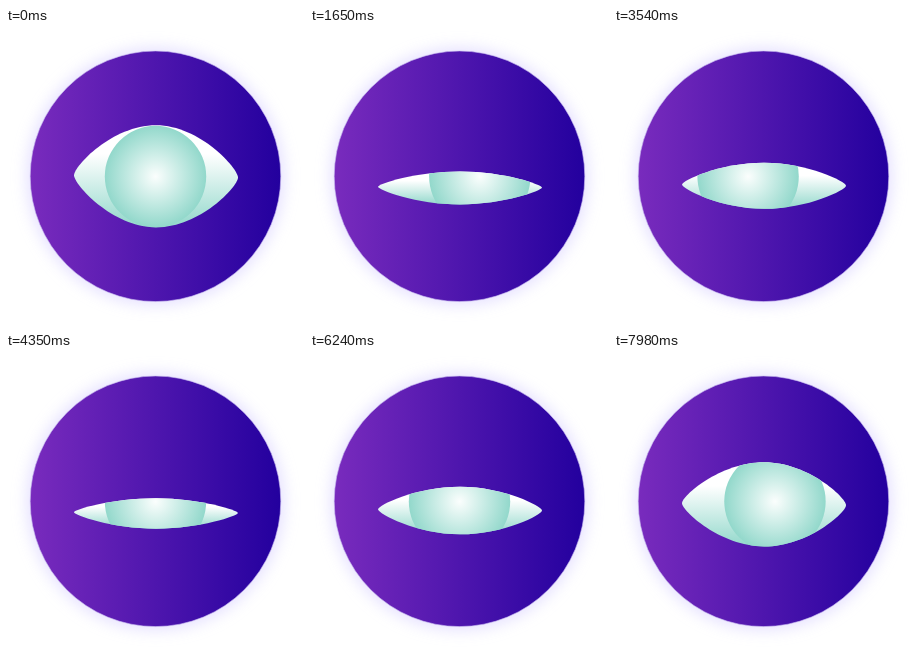
Animation of 298 by 297 pixels, one loop 8 s. Source, as an HTML page:

```html
<!DOCTYPE html>
<html lang="en">
<head>
<meta charset="utf-8">
<title>Blinking eye</title>
<style>
  html, body { margin: 0; width: 100%; height: 100%; overflow: hidden; background: #fff; }
  svg { display: block; width: 100%; height: 100%; }
</style>
</head>
<body>
<svg viewBox="0 0 298 297">
  <defs>
    <linearGradient id="disc">
      <stop offset="0" stop-color="#792bbd"/>
      <stop offset="1" stop-color="#23009e"/>
    </linearGradient>
    <linearGradient id="white" x2="0" y2="1">
      <stop offset=".28" stop-color="#fff"/>
      <stop offset="1" stop-color="#92d8cb"/>
    </linearGradient>
    <radialGradient id="mint">
      <stop offset="0" stop-color="#fbfefd"/>
      <stop offset="1" stop-color="#92d8cb"/>
    </radialGradient>
    <filter id="blur" x="-20%" y="-20%" width="140%" height="140%">
      <feGaussianBlur stdDeviation="8"/>
    </filter>
    <clipPath id="lids"><path id="opening"/></clipPath>
  </defs>
  <circle cx="149.5" cy="148.5" r="128" fill="#dcd6ff" opacity=".8" filter="url(#blur)"/>
  <circle cx="149.5" cy="148.3" r="125.3" fill="url(#disc)" stroke="#c9bdf0" stroke-width=".6"/>
  <path id="eye" fill="url(#white)"/>
  <g clip-path="url(#lids)">
    <circle id="iris" cy="148.5" r="50.7" fill="url(#mint)"/>
  </g>
</svg>
<script>
const LOOP = 8000;
const $ = id => document.getElementById(id);
const eye = $('eye'), opening = $('opening'), iris = $('iris');

// [time, value] keys, linear in between
const blink = [[0, 1], [1274, .1], [2770, 1], [4041, .1], [5430, 1], [6760, .13], [7290, .43], [8000, .835]];
const gaze = [[0, 0], [1667, 20.5], [3333, -20.5], [4170, 0], [7045, 0], [8000, 11.7]];

function at(keys, t) {
  const i = Math.max(1, keys.findIndex(k => k[0] >= t));
  const [t0, a] = keys[i - 1], [t1, b] = keys[i];
  return a + (b - a) * (t - t0) / (t1 - t0);
}

function lidPath(open) {
  const shut = 1 - open;
  const top = 97.2 + 68.7 * shut, bottom = 199.4 - 34 * shut;
  const left = 147.3 + 17 * shut, right = 149.5 + 15 * shut;
  const h = 9 * open;
  return `M68 ${left}C68 ${left - h} 106 ${top} 150 ${top}S232 ${right - h} 232 ${right}` +
    `S194 ${bottom} 150 ${bottom}S68 ${left + h} 68 ${left}Z`;
}

function draw(t) {
  const d = lidPath(at(blink, t));
  eye.setAttribute('d', d);
  opening.setAttribute('d', d);
  iris.setAttribute('cx', 149.5 + at(gaze, t));
}

const start = performance.now();
function tick() {
  draw((performance.now() - start) % LOOP);
  requestAnimationFrame(tick);
}
tick();
</script>
</body>
</html>
```
